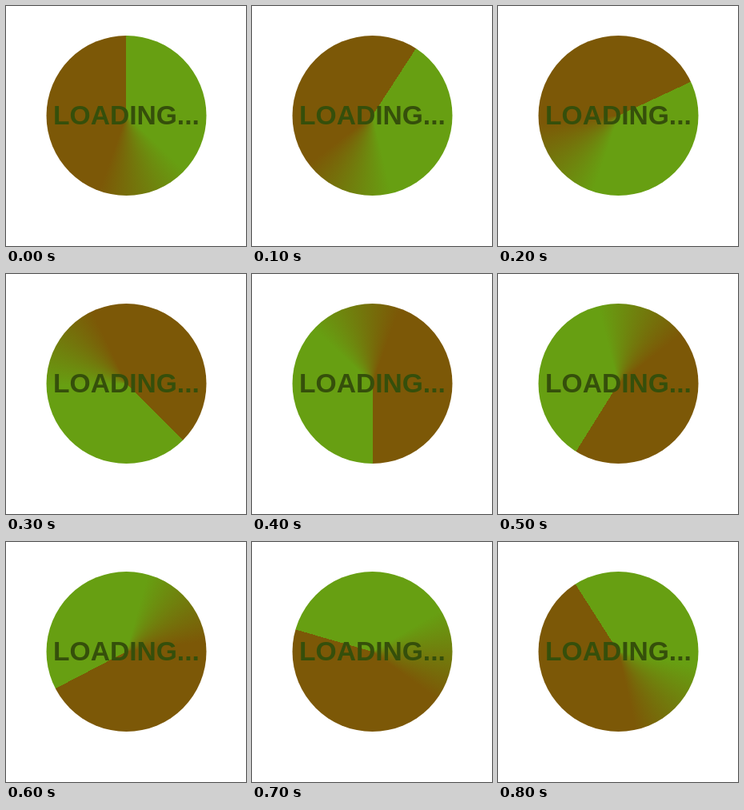
Animation of 300x300 px, one loop 0.9 s. Source, as an HTML page with a canvas:

```html
<!DOCTYPE html>
<html lang="en">
<head>
<meta charset="utf-8">
<title>Loading</title>
<style>
  html, body { margin: 0; width: 100%; height: 100%; overflow: hidden; background: #fff; }
  canvas, svg { position: absolute; left: 0; top: 0; width: 300px; height: 300px; }
  text { font: bold 33.6px "Liberation Sans", Arial, sans-serif; font-kerning: none; fill: #354f0b; }
</style>
</head>
<body>
<canvas id="disc" width="300" height="300"></canvas>
<svg viewBox="0 0 300 300"><text x="59" y="148">LOADING...</text></svg>
<script>
  const ctx = document.getElementById('disc').getContext('2d');
  const GREEN = '#679f12', BROWN = '#7c5807';
  const CX = 150.5, CY = 137, R = 100;
  const STEP = 100;
  // Clockwise angle of the sharp edge, in degrees from the top
  const ANGLES = [0, 33, 65, 135, 180, 212, 242.5, 286, 327.5];
  const FADE_START = 133 / 360, FADE_END = 200 / 360;
  let shown = -1;

  function drawDisc(angle) {
    const sweep = ctx.createConicGradient((angle - 90) * Math.PI / 180, CX, CY);
    sweep.addColorStop(0, GREEN);
    sweep.addColorStop(FADE_START, GREEN);
    sweep.addColorStop(FADE_END, BROWN);
    sweep.addColorStop(1, BROWN);
    ctx.clearRect(0, 0, 300, 300);
    ctx.fillStyle = sweep;
    ctx.beginPath();
    ctx.arc(CX, CY, R, 0, Math.PI * 2);
    ctx.fill();
  }

  function update(ms) {
    const step = Math.floor(ms / STEP) % ANGLES.length;
    if (step !== shown) drawDisc(ANGLES[shown = step]);
  }

  const start = performance.now();
  function tick() {
    update(performance.now() - start);
    requestAnimationFrame(tick);
  }
  tick();
</script>
</body>
</html>
```
